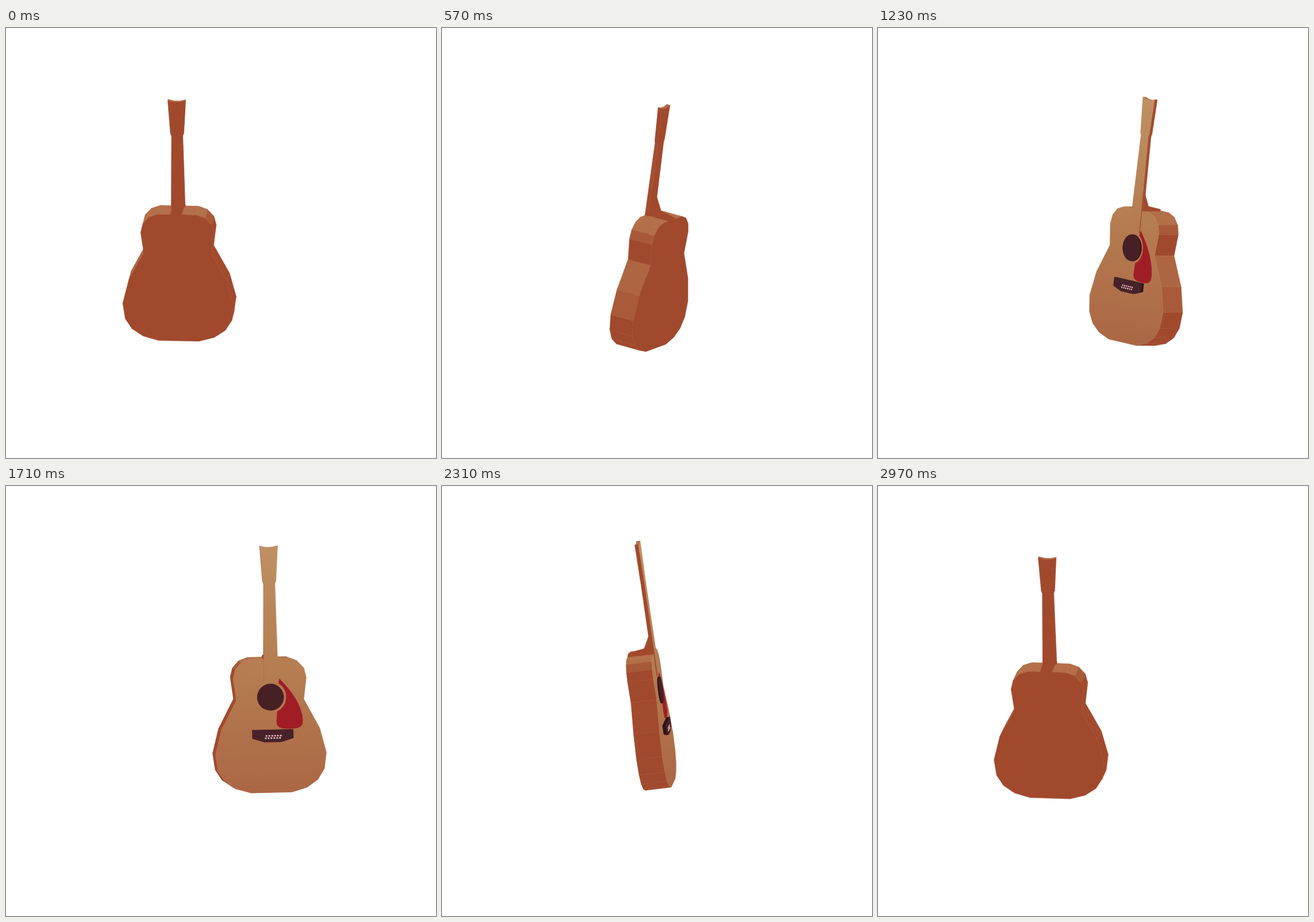
An HTML page with a canvas that plays this animation: 748x748 px, repeating every 3000 ms.

```html
<!DOCTYPE html>
<html lang="en">
<head>
<meta charset="utf-8">
<title>Turning guitar</title>
<style>
  html, body { margin: 0; width: 100%; height: 100%; overflow: hidden; background: #fff; }
  canvas { display: block; width: 748px; height: 748px; }
</style>
</head>
<body>
<canvas id="stage" width="748" height="748"></canvas>
<script>
const ctx = document.getElementById('stage').getContext('2d');
const LOOP = 3000, STEP = 30, RAD = Math.PI / 180;

// Guitar space: u across, v along the neck, w out of the soundboard.
const LEAN = { sin: 0.143, cos: 0.99 };
const PITCH = { sin: 0.207, cos: 0.978 };
const AXIS = { x: 382.2, y: 532.8, u: 79, w: 12.5 };
const DEPTH = 45.5, TOP = 234, NECK_MID = 2;
const DARK = [161, 73, 45], LIGHT = [179, 111, 73];
const WOOD = 'wood';

const range = n => Array.from({ length: n }, (_, i) => i);

// Part of a superellipse; power 2 is a plain ellipse.
function arc(cu, cv, a, b, from, to, steps, power = 2) {
  const bend = x => Math.sign(x) * Math.abs(x) ** (2 / power);
  return range(steps + 1).map(i => {
    const t = (from + (to - from) * i / steps) * RAD;
    return [cu + a * bend(Math.cos(t)), cv + b * bend(Math.sin(t))];
  });
}

const mirror = (half, mid = 0) => [
  ...half.map(([u, v]) => [mid + u, v]),
  ...half.map(([u, v]) => [mid - u, v]).reverse()
];

function normal(pts) {
  const n = [0, 0, 0];
  pts.forEach((p, i) => {
    const q = pts[(i + 1) % pts.length];
    n[0] += (p[1] - q[1]) * (p[2] + q[2]);
    n[1] += (p[2] - q[2]) * (p[0] + q[0]);
    n[2] += (p[0] - q[0]) * (p[1] + q[1]);
  });
  const len = Math.hypot(...n) || 1;
  return n.map(c => c / len);
}

function shade([u, v, w]) {
  const k = 0.18 * u + 0.7 * v + 0.5 * w;
  const t = Math.min(1, Math.max(0, (k - 0.15) / 0.45));
  return `rgb(${DARK.map((d, i) => Math.round(d + (LIGHT[i] - d) * t))})`;
}

// Joins two rings into a closed solid; the end cap is drawn last.
function solid(a, b, cap, side) {
  const face = (pts, color, isCap) => {
    const n = normal(pts);
    return { pts, n, color: color || shade(n), isCap };
  };
  const faces = a.map((p, i) => {
    const j = (i + 1) % a.length;
    return face([p, a[j], b[j], b[i]], side, false);
  });
  faces.push(face(b, cap, true), face([...a].reverse(), side, true));
  return faces;
}

const slab = (ring, w0, w1, cap, side) =>
  solid(ring.map(([u, v]) => [u, v, w0]), ring.map(([u, v]) => [u, v, w1]), cap, side);

const hips = arc(0, 68, 97, 70, -74, 0, 4, 2.56);
const shoulders = arc(30, TOP - 34, 34, 34, 0, 84, 3);
const body = slab(mirror([...hips, [86, 111], [59, 162], ...shoulders]), -DEPTH, 0, WOOD);

const neck = slab(mirror([
  [12, TOP - 1], [9.6, 364], [11.5, 369], [15.4, 430], [5, 427.5]
], NECK_MID), -4.5, 2, WOOD);
const board = slab(mirror([[12.5, 195], [12, TOP + 2]], NECK_MID), 0, 2, WOOD);

const heelSide = u => [
  [TOP - 1, -4.5], [265, -4.5], [TOP + 7, -17], [TOP + 2, -DEPTH], [TOP - 1, -DEPTH]
].map(([v, w]) => [u, v, w]);
const red = `rgb(${DARK})`;
const heel = solid(heelSide(-8), heelSide(11), red, red);

const HOLE = [0.7, 166.6];
const hole = slab(arc(...HOLE, 23, 23, 0, 350, 35), 0, 3, '#472025', '#301317');

const outerEdge = range(9).map(i => {
  const t = i / 8;
  return [56.4 - 39.4 * t ** 1.8, 125 + 73 * t];
});
const guard = slab([
  ...arc(...HOLE, 28, 28, 58, -65, 10),
  ...arc(33.7, 125, 22.7, 14, 180, 360, 12, 3),
  ...outerEdge
], 0, 0.8, '#a01d26', '#a01d26');

const bridge = slab(mirror([[15, 88.5], [35.5, 95], [35.5, 109.5]], 3.5),
  0, 6, '#47222a', '#2e131a');

const pins = range(12).map(i => {
  const row = i % 2;
  return [-8 + 5 * (i >> 1) - 1.5 * row, 99.5 - 4 * row, 6.2];
});

function pose(angle) {
  const s = Math.sin(angle), c = Math.cos(angle);
  const place = ([u, v, w]) => {
    const out = AXIS.w - LEAN.sin * v + LEAN.cos * w;
    const across = AXIS.u + u;
    const up = LEAN.cos * v + LEAN.sin * w;
    const z = out * s + across * c;
    return [
      AXIS.x - out * c + across * s,
      AXIS.y - PITCH.cos * up + PITCH.sin * z,
      PITCH.sin * up + PITCH.cos * z
    ];
  };
  const eye = [
    c * PITCH.cos,
    LEAN.cos * PITCH.sin - LEAN.sin * s * PITCH.cos,
    LEAN.sin * PITCH.sin + LEAN.cos * s * PITCH.cos
  ];
  return { place, eye };
}

function drawSolid(faces, view, wood) {
  faces
    .filter(f => f.n.reduce((sum, k, i) => sum + k * view.eye[i], 0) > 0)
    .map(f => {
      const pts = f.pts.map(view.place);
      return { ...f, pts, depth: pts.reduce((sum, p) => sum + p[2], 0) / pts.length };
    })
    .sort((a, b) => a.isCap - b.isCap || a.depth - b.depth)
    .forEach(f => {
      ctx.beginPath();
      f.pts.forEach(([x, y]) => ctx.lineTo(x, y));
      ctx.closePath();
      ctx.fillStyle = ctx.strokeStyle = f.color === WOOD ? wood : f.color;
      ctx.fill();
      ctx.stroke();
    });
}

function drawPins(view) {
  const squash = Math.max(0.4, view.eye[2]);
  ctx.fillStyle = '#e6b8bc';
  pins.forEach(p => {
    const [x, y] = view.place(p);
    ctx.beginPath();
    ctx.ellipse(x, y, 1.6 * squash, 1.6, 0, 0, 2 * Math.PI);
    ctx.fill();
  });
}

function draw(time) {
  const turn = Math.floor((time % LOOP) / STEP) * STEP / LOOP * 360;
  const angle = turn - 101.8 + 6.8 * Math.cos((turn - 15) * RAD);
  const view = pose(angle * RAD);
  const [x0, y0] = view.place([0, 0, 0]);
  const [x1, y1] = view.place([0, 430, 0]);
  const wood = ctx.createLinearGradient(x0, y0, x1, y1);
  wood.addColorStop(0, '#ab6744');
  wood.addColorStop(0.5, '#b57d51');
  wood.addColorStop(1, '#be9062');

  ctx.clearRect(0, 0, 748, 748);
  ctx.lineWidth = 0.5;
  ctx.lineJoin = 'round';
  const show = parts => parts.forEach(p => drawSolid(p, view, wood));
  if (view.eye[2] > 0) {
    show([body, guard, hole, bridge]);
    drawPins(view);
    show([heel, board, neck]);
  } else {
    show([bridge, hole, guard, board, body, neck, heel]);
  }
}

const start = performance.now();
function tick() {
  draw(performance.now() - start);
  requestAnimationFrame(tick);
}
tick();
</script>
</body>
</html>
```
